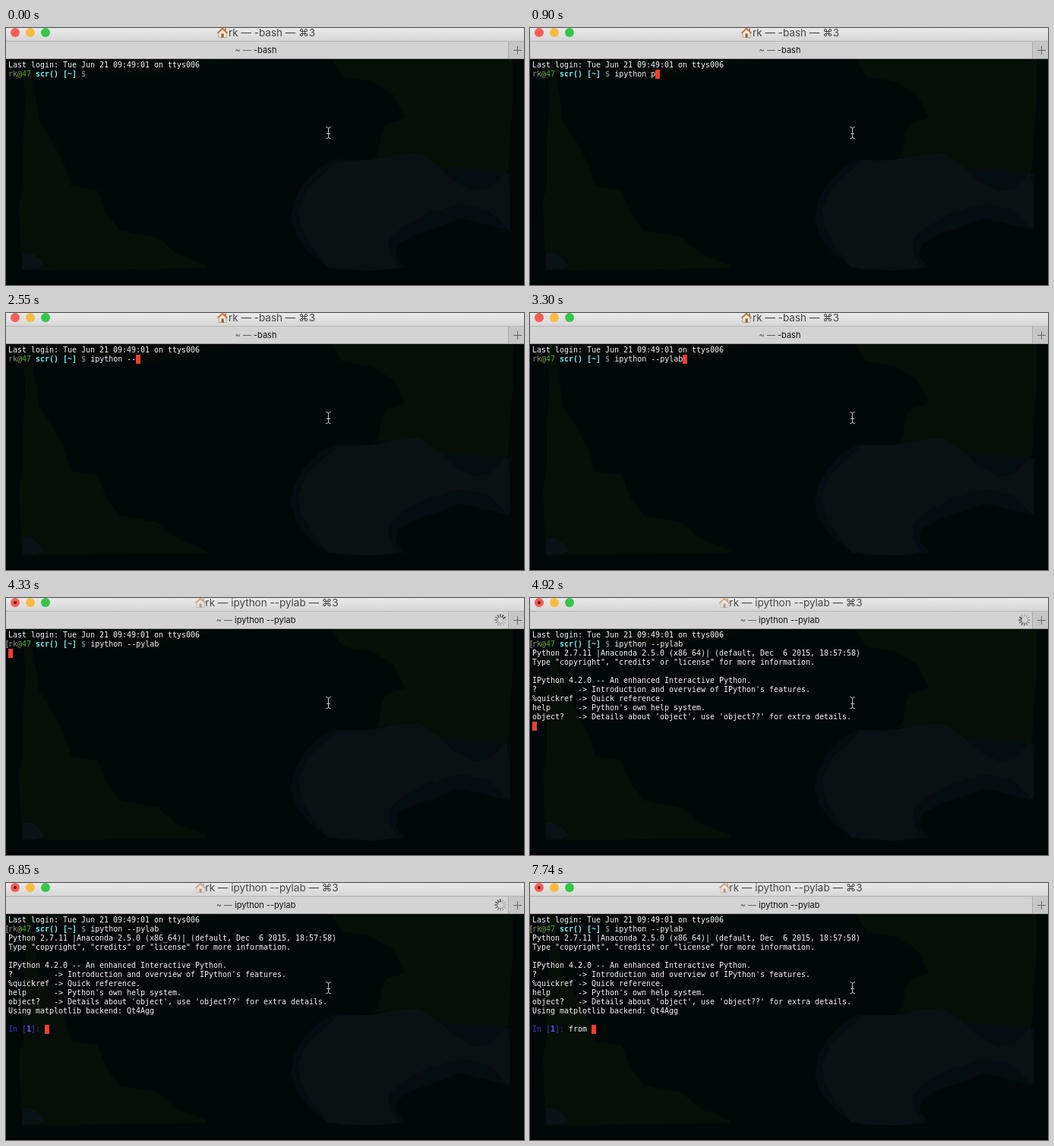
An HTML page that plays this animation: 682x339 px, repeating every 8000 ms.

```html
<!DOCTYPE html>
<html lang="en">
<head>
<meta charset="utf-8">
<title>Terminal session</title>
<style>
html, body { margin: 0; width: 100%; height: 100%; overflow: hidden; background: #010808; }
svg { display: block; width: 100vw; height: 100vh; }
text { white-space: pre; }
.mono { font: 10px "DejaVu Sans Mono", monospace; letter-spacing: -0.0205px; fill: #f4f6f6; }
.ui { font-family: Inter, "DejaVu Sans", sans-serif; text-anchor: middle; }
.b { font-weight: bold; }
</style>
</head>
<body>
<svg viewBox="0 0 682 339" xmlns="http://www.w3.org/2000/svg">
  <defs>
    <linearGradient id="bar" x2="0" y2="1">
      <stop stop-color="#e9e9e9"/><stop offset="1" stop-color="#d5d5d5"/>
    </linearGradient>
  </defs>

  <!-- wallpaper -->
  <rect width="682" height="339" fill="#010808"/>
  <g fill="#050e07">
    <path d="M22 41H36L34 66 40 96 43 122 62 151 77 180 86 209 121 214 132 243 150 267 199 276 226 298 264 313 263 317 20 320 17 230 22 205V150L25 100Z"/>
    <path d="M428 41 443 64 482 71 510 88 525 119 500 127 494 139 491 163 484 172 437 175 545 166 590 200 618 216 642 211 661 188 667 100V41Z"/>
    <path d="M40 41H300L238 53 190 66 150 62 90 50Z" opacity=".45"/>
  </g>
  <path fill="#040e10" d="M433 173 412 184 392 205 379 228 375 252 382 275 400 297 420 313 440 319 490 320 525 316 513 301 516 285 535 274 560 258 600 234 640 240 660 267 664 264V192Z"/>
  <path fill="#091112" d="M437 175 480 174 515 167 545 165 567 180 590 202 618 216 638 212 659 190 663 214V266L632 257 598 251 560 241 520 264 504 280 505 298 516 316 480 320 424 316 403 290 388 263 385 240 396 213Z"/>
  <path fill="#040e10" d="M664 267 598 251 570 262 530 275 515 286 503 291 506 277 522 262 550 250 580 237 600 232 635 240Z"/>
  <path fill="#091215" d="M22 296 34 297 44 304 51 314 40 318 22 319Z"/>
  <rect y="336" width="682" height="3" fill="#000303"/>

  <!-- window chrome -->
  <rect width="682" height="18" fill="url(#bar)"/>
  <rect y="17" width="682" height="24" fill="#d3d3d3"/>
  <rect y="17" width="682" height="1" fill="#b5b5b5"/>
  <rect y="40" width="682" height="1" fill="#a2a2a2"/>
  <rect x="661" y="18" width="21" height="22" fill="#c6c6c6"/>
  <rect x="661" y="18" width="1" height="22" fill="#acacac"/>
  <path d="M668 29.5H679M673.5 24V35" stroke="#666"/>
  <circle cx="12" cy="6" r="6" fill="#f95c55"/>
  <circle cx="32" cy="6" r="6" fill="#fabb3d"/>
  <circle cx="52" cy="6" r="6" fill="#35c748"/>
  <circle id="dot" cx="12" cy="6" r="2" fill="#5a0b08"/>
  <g id="house">
    <path d="M2 6.5V13H12V6.5L7 2Z" fill="#f1eadd" stroke="#a58c70" stroke-width=".7"/>
    <path d="M5.5 8H8.7V13H5.5Z" fill="#8d6138"/>
    <path d="M.6 7.3 7 1.2 13.4 7.3" fill="none" stroke="#c1763d" stroke-width="1.9"/>
    <path d="M10.2 1H11.8V5L10.2 3.5Z" fill="#a4693e"/>
  </g>
  <text id="title" class="ui" x="350" y="11" font-size="13.5" fill="#454545"></text>
  <text class="ui" x="329" y="33" font-size="11" fill="#555">~ — <tspan id="tab" fill="#111"></tspan></text>
  <g id="spinner" transform="translate(651 29)" stroke="#333" stroke-width="1.4" stroke-linecap="round"></g>

  <!-- terminal -->
  <rect id="cursor" width="6" height="12" fill="#f03e2d"/>
  <text class="mono" x="3" y="52">Last login: Tue Jun 21 09:49:01 on ttys006</text>
  <text id="mark" class="mono" x="-1.5" y="64" style="fill:#aab0b0">[</text>
  <text class="mono" x="3" y="64"><tspan fill="#87947f">rk</tspan><tspan fill="#7fa52e">@</tspan><tspan fill="#4ba52c">47</tspan> <tspan class="b" fill="#72f3f2">scr() [~]</tspan> <tspan fill="#8aa6a6">$</tspan> <tspan id="cmd"></tspan></text>
  <g id="banner"></g>
  <text id="backend" class="mono" x="3" y="172">Using matplotlib backend: Qt4Agg</text>
  <text id="prompt" class="mono" x="3" y="196"><tspan fill="#4036d8">In [</tspan><tspan class="b" fill="#6259ff">1</tspan><tspan fill="#4036d8">]: </tspan><tspan id="input"></tspan></text>

  <!-- mouse pointer -->
  <g fill="none" stroke-linecap="round">
    <path id="beam" d="M421.5 130.5Q424.5 130.5 424.5 133V143.5Q424.5 146 421.5 146M427.5 130.5Q424.5 130.5 424.5 133M424.5 143.5Q424.5 146 427.5 146M422.5 139.5H426.5" stroke="#000" stroke-width="2.4"/>
    <use href="#beam" style="display:none"/>
    <path d="M421.5 130.5Q424.5 130.5 424.5 133V143.5Q424.5 146 421.5 146M427.5 130.5Q424.5 130.5 424.5 133M424.5 143.5Q424.5 146 427.5 146M422.5 139.5H426.5" stroke="#c4c9c9" stroke-width="1"/>
  </g>
</svg>
<script>
const LOOP = 8000, CELL = 6, LINE = 12, LEFT = 3, TOP = 43;
const NS = "http://www.w3.org/2000/svg";
const $ = id => document.getElementById(id);

function add(parent, tag, attrs, text = "") {
  const node = document.createElementNS(NS, tag);
  for (const key in attrs) node.setAttribute(key, attrs[key]);
  node.textContent = text;
  parent.append(node);
  return node;
}

const banner = `Python 2.7.11 |Anaconda 2.5.0 (x86_64)| (default, Dec  6 2015, 18:57:58)
Type "copyright", "credits" or "license" for more information.

IPython 4.2.0 -- An enhanced Interactive Python.
?         -> Introduction and overview of IPython's features.
%quickref -> Quick reference.
help      -> Python's own help system.
object?   -> Details about 'object', use 'object??' for extra details.`;
banner.split("\n").forEach((line, i) =>
  add($("banner"), "text", { class: "mono", x: LEFT, y: 76 + i * LINE }, line));

const spokes = Array.from({ length: 12 }, (_, i) =>
  add($("spinner"), "path", { d: "M0 -4.2V-7.3", transform: `rotate(${i * 30})` }));

// [time, text] pairs for what is typed at each prompt
const shell = [
  [0, ""], [150, "ip"], [300, "ipy"], [450, "ipyth"], [600, "ipython"], [750, "ipython "],
  [900, "ipython p"], [1050, "ipython pyl"], [1200, "ipython pyla"],
  [1500, "ipython pyl"], [1650, "ipython p"], [1800, "ipython "],
  [2400, "ipython -"], [2550, "ipython --"], [2850, "ipython --p"], [3000, "ipython --py"],
  [3150, "ipython --pyl"], [3300, "ipython --pylab"]
];
const python = [[0, ""], [7290, "f"], [7440, "fr"], [7590, "fro"], [7740, "from "]];
const ENTER = 3590, RUN = 3740, SPIN = 4180, BANNER = 4780, BACKEND = 6700, PROMPT = 6840, IDLE = 7140;

const at = (steps, t) => steps.filter(s => s[0] <= t).pop()[1];
const show = (id, on) => $(id).setAttribute("visibility", on ? "visible" : "hidden");
const within = (t, a, b) => t >= a && t < b;
const put = (id, text) => { if ($(id).textContent !== text) $(id).textContent = text; };

function cursorCell(t, cmd, input) {
  if (t < ENTER) return [18 + cmd.length, 1];
  if (t < BANNER) return [0, 2];
  if (t < BACKEND) return [0, 10];
  if (t < PROMPT) return [0, 11];
  return [8 + input.length, 12];
}

function draw(t) {
  const cmd = at(shell, t), input = at(python, t), running = t >= RUN;
  const [col, row] = cursorCell(t, cmd, input);
  put("cmd", cmd);
  put("input", input);
  $("cursor").setAttribute("x", LEFT + col * CELL);
  $("cursor").setAttribute("y", TOP + row * LINE - (row > 10 ? 0 : 0));
  show("cursor", t >= 150 && !within(t, 5510, 6250));

  const name = running ? "ipython --pylab" : "-bash";
  put("title", `rk — ${name} — ⌘3`);
  put("tab", name);
  $("house").setAttribute("transform", `translate(${running ? 249 : 278} -.5)`);
  $("house").setAttribute("opacity", running ? .55 : 1);
  show("dot", running);
  show("mark", t >= ENTER);
  show("banner", t >= BANNER);
  show("backend", t >= BACKEND);
  show("prompt", t >= PROMPT);

  show("spinner", within(t, SPIN, IDLE));
  const head = Math.floor((t - SPIN) / 147.5) * 2;
  spokes.forEach((s, i) => {
    const age = (((head - i) % 12) + 12) % 12;
    s.setAttribute("opacity", Math.max(.2, 1 - age * .09));
  });
}

const start = performance.now();
function tick() {
  draw((performance.now() - start) % LOOP);
  requestAnimationFrame(tick);
}
tick();
</script>
</body>
</html>
```
